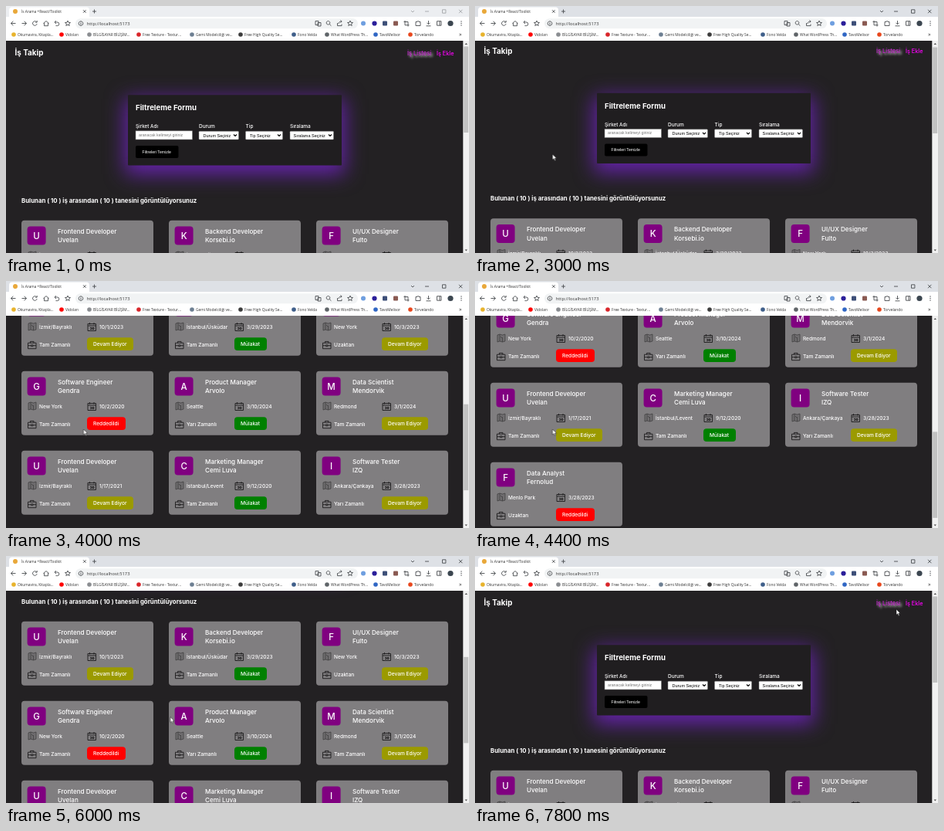
An HTML page for the animation above (8 s loop, 600x320 px).

```html
<!DOCTYPE html>
<html lang="tr">
<head>
<meta charset="utf-8">
<title>İş Takip</title>
<style>
@property --s { syntax: '<number>'; inherits: true; initial-value: 0; }
html, body { margin: 0; width: 100%; height: 100%; overflow: hidden; background: #232123; }
svg { display: block; width: 600px; height: 320px; animation: scroll 8s infinite; }
text { font-family: Inter, sans-serif; font-weight: 500; fill: #fff; white-space: pre; }
.bold { font-weight: 700; }
.ui { font-family: "Open Sans", "Noto Sans", sans-serif; font-weight: 400; fill: #333; }
.field { font-family: "Liberation Sans", Arial, sans-serif; font-weight: 400; }
.line { fill: none; stroke: #4a4d51; stroke-width: .9; }
.icon { fill: none; stroke: #1c1b1c; stroke-width: .9; }
.map { fill: #6f6d6f; stroke: #3c3a3c; stroke-width: .7; }
.glow { filter: blur(13px); }
.lit { text-shadow: 2px 2px 3px #ddd; }
#page { transform: translateY(calc(var(--s) * -1px)); }
#thumb { transform: translateY(calc(var(--s) * .406px)); }
#mouse { animation: mouse 8s infinite; }
#strip { animation: strip 8s step-end infinite; }
#controls { animation: controls 8s step-end infinite; }
/* the window gains focus after one second */
@keyframes strip { 0% { fill: #eceef1; } 12.5%, 100% { fill: #dee1e6; } }
@keyframes controls { 0% { opacity: .45; } 12.5%, 100% { opacity: 1; } }
@keyframes scroll {
  0% { --s: 0; animation-timing-function: step-end; }
  37.5% { --s: 2.5; animation-timing-function: steps(3); }
  45% { --s: 176; animation-timing-function: steps(4); }
  55% { --s: 352; animation-timing-function: steps(2); }
  60% { --s: 367; animation-timing-function: step-end; }
  67.5% { --s: 367; animation-timing-function: steps(3); }
  75% { --s: 193; animation-timing-function: steps(2); }
  80% { --s: 78; animation-timing-function: steps(2); }
  85% { --s: 10; animation-timing-function: step-end; }
  87.5%, 100% { --s: 0; }
}
@keyframes mouse {
  0% { transform: translate(225px, 330px); animation-timing-function: step-end; }
  12.5% { transform: translate(225px, 312px); animation-timing-function: steps(5); }
  25% { transform: translate(100.5px, 192px); animation-timing-function: step-end; }
  62.5% { transform: translate(100.5px, 192px); animation-timing-function: steps(2); }
  67.5% { transform: translate(213px, 208.5px); animation-timing-function: step-end; }
  92.5% { transform: translate(300px, 170px); animation-timing-function: step-end; }
  95% { transform: translate(440px, 106px); animation-timing-function: step-end; }
  97.5%, 100% { transform: translate(546px, 69px); }
}
</style>
</head>
<body>
<svg id="stage" viewBox="0 0 600 320"></svg>
<script>
const text = (x, y, size, str, attrs = '') =>
  `<text x="${x}" y="${y}" font-size="${size}" ${attrs}>${str}</text>`;
const rect = (x, y, w, h, fill, r = 0, attrs = '') =>
  `<rect x="${x}" y="${y}" width="${w}" height="${h}" rx="${r}" fill="${fill}" ${attrs}/>`;
const dot = (x, y, r, fill) => `<circle cx="${x}" cy="${y}" r="${r}" fill="${fill}"/>`;
const path = (d, cls = 'line', attrs = '') => `<path d="${d}" class="${cls}" ${attrs}/>`;

const badges = {
  'Devam Ediyor': [60, '#9b9a00'],
  'Mülakat': [42, '#008000'],
  'Reddedildi': [50, '#ff0000']
};
const [ongoing, interview, rejected] = Object.keys(badges);
const full = 'Tam Zamanlı', part = 'Yarı Zamanlı', remote = 'Uzaktan';
const jobs = [
  ['Frontend Developer', 'Uvelan', 'İzmir/Bayraklı', '10/1/2023', full, ongoing],
  ['Backend Developer', 'Korsebi.io', 'İstanbul/Üsküdar', '3/29/2023', full, interview],
  ['UI/UX Designer', 'Fulto', 'New York', '10/3/2023', remote, ongoing],
  ['Software Engineer', 'Gendra', 'New York', '10/2/2020', full, rejected],
  ['Product Manager', 'Arvolo', 'Seattle', '3/10/2024', part, interview],
  ['Data Scientist', 'Mendorvik', 'Redmond', '3/1/2024', full, ongoing],
  ['Frontend Developer', 'Uvelan', 'İzmir/Bayraklı', '1/17/2021', full, ongoing],
  ['Marketing Manager', 'Cemi Luva', 'İstanbul/Levent', '9/12/2020', full, interview],
  ['Software Tester', 'IZQ', 'Ankara/Çankaya', '3/28/2023', part, ongoing],
  ['Data Analyst', 'Fernolud', 'Menlo Park', '3/28/2023', remote, rejected]
];

function card([title, firm, place, date, kind, status], i) {
  const x = 20 + i % 3 * 191, y = 278 + Math.floor(i / 3) * 103;
  const [w, color] = badges[status];
  return `<g transform="translate(${x} ${y})">` +
    rect(0, -.3, 171, 83, '#807e80', 4) +
    rect(7.6, 7.4, 24, 24.2, '#800080', 4) +
    text(19.6, 23.6, 11.5, firm[0], 'text-anchor="middle"') +
    text(47, 16.5, 8.1, title) + text(47, 28.4, 8.1, firm) +
    path('M9 41l3 -1l3.5 1l3.5 -1v9l-3.5 1l-3.5 -1l-3 1zM12 40v9M15.5 44v6M13 43l2 2', 'map') +
    text(23, 47.5, 6.5, place) +
    path('M86 41.5h10.5v9h-10.5zM86 44h10.5M88.5 40v2.5M94 40v2.5M89 46.5h2v2h-2M92 46.5h2v2h-2z', 'icon') +
    text(101, 47.5, 6.6, date) +
    path('M8.5 66.2h10.5v7.5h-10.5zM11.5 66.2v-1.8h4.5v1.8M8.5 69.7h4M15 69.7h4M12.7 68.9h2.2v1.8h-2.2z', 'icon') +
    text(23, 71.3, 6.65, kind) +
    rect(85, 59.3, w, 16.7, color, 4) + text(93, 69.5, 6.6, status) + '</g>';
}

function select(x, w, label, hint, tx) {
  return text(x, 158, 6.5, label) +
    rect(x, 162.3, w, 10.7, '#fff', 1, 'stroke="#767676" stroke-width=".5"') +
    text(tx, 169.5, 5.5, hint, 'class="field" style="fill:#000"') +
    path(`M${x + w - 6.5} 166.5l2 2l2 -2`, 'line', 'style="stroke:#000;stroke-width:1.1"');
}

const form =
  rect(154, 120, 285, 98, '#6422a8', 0, 'class="glow"') +
  rect(158, 115.3, 277, 91.2, '#201e20', 1) +
  text(168, 135.4, 9.6, 'Filtreleme Formu', 'class="bold"') +
  text(168, 158, 6.3, 'Şirket Adı') +
  rect(168, 161.8, 73.5, 11.2, '#fff', 0, 'stroke="#767676" stroke-width=".6"') +
  text(172, 168.8, 5.25, 'aranacak kelimeyi giriniz', 'class="field" style="fill:#757575"') +
  select(250, 51.5, 'Durum', 'Durum Seçiniz', 255.5) +
  select(310.5, 48, 'Tip', 'Tip Seçiniz', 316) +
  select(368, 56.5, 'Sıralama', 'Sıralama Seçiniz', 372.5) +
  rect(168, 181, 55.5, 16, '#000', 2) +
  text(176.5, 190.8, 5.2, 'Filtreleri Temizle', 'class="field"');

const page = '<g id="page">' +
  text(11.6, 64, 9.9, 'İş Takip', 'class="bold"') +
  text(520, 63.5, 7.5, 'İş Listesi', 'class="lit" style="fill:#d222dc"') +
  text(558, 63.5, 7.3, 'İş Ekle', 'style="fill:#f0f"') +
  form +
  text(20, 254.6, 7.83, 'Bulunan ( 10 ) iş arasından ( 10 ) tanesini görüntülüyorsunuz', 'class="bold"') +
  jobs.map(card).join('') + '</g>';

const bookmarks = [
  [15, 'Okumavira, Kitapla...', '#e8b32c'],
  [77, 'Vidolan', '#f00'],
  [113, 'BİLGİSAYAR BİLİŞİM...', '#8a8d91'],
  [177, 'Free Texture - Textur...', '#d9252a'],
  [246, 'Gemi Modelciliği ve...', '#6d7f92'],
  [309, 'Free High Quality Se...', '#3b3b3b'],
  [378, 'Fono Velda', '#3f5f8a'],
  [421, 'What WordPress Th...', '#5f6468'],
  [484, 'TavoMelisor', '#2f66c4'],
  [529, 'Torvelando', '#e8471c']
];
const ui = (x, y, size, str) => text(x, y, size, str, 'class="ui"');

const chrome =
  rect(0, 0, 600, 45, '#fff') + rect(0, 0, 600, 14, '#dee1e6', 0, 'id="strip"') +
  rect(4, 1.5, 104, 16, '#fff', 4) +
  dot(12, 7, 3, '#e9a83a') + ui(20, 9, 4.75, 'İs Arama +React/Toolkit') +
  path('M100 5.2l3.6 3.6M103.6 5.2l-3.6 3.6M112 7h5M114.5 4.5v5') +
  path('M525 6l2 2l2 -2M543 7h5M565.5 4.8h4.4v4.4h-4.4zM587 4.8l4.4 4.4M591.4 4.8l-4.4 4.4', 'line', 'id="controls"') +
  path('M12.5 22.5h-6M9.3 19.7l-2.8 2.8l2.8 2.8M20.5 22.5h6M23.7 19.7l2.8 2.8l-2.8 2.8') +
  path('M39.6 20.8a2.8 2.8 0 1 0 .5 2.3M40.2 18.9v2.2h-2.2M48.5 22.5l3.5 -3l3.5 3M49.5 22v3.7h5v-3.7') +
  path('M65 19l-2 2l2 2M63 21h3.5a2.3 2.3 0 0 1 0 4.6h-2') +
  path('M80 19l1 2.3l2.5 .2l-1.9 1.6l.6 2.4l-2.2 -1.3l-2.2 1.3l.6 -2.4l-1.9 -1.6l2.5 -.2z') +
  rect(90, 16.2, 366, 13, '#f1f3f4', 6.5) +
  path('M97 19.8a2.8 2.8 0 1 0 .01 0M97 22v2.2M97 20.9v.6') +
  ui(104.8, 24.7, 5.75, 'http://localhost:5173') +
  path('M401 19.5h4v5h-4zM404 21.5h4v4.5h-4zM417.5 19.5a2.3 2.3 0 1 0 .01 0M419.2 23.5l2.2 2.2') +
  path('M429.5 22v3.6h5.5v-2M431 23c0 -2 1.5 -3 4 -3M433.5 18.5l1.7 1.5l-1.7 1.5') +
  path('M446 19l1 2.3l2.5 .2l-1.9 1.6l.6 2.4l-2.2 -1.3l-2.2 1.3l.6 -2.4l-1.9 -1.6l2.5 -.2z') +
  dot(463, 22.5, 3, '#6f9fe0') + dot(477.5, 22.5, 3.1, '#2b1f9a') +
  rect(488, 19.5, 6, 6, '#3d4f78', 1) + rect(502, 19.5, 6, 6, '#8a5a52', 1) +
  path('M517 18.8v6h5.5M515.5 20.5h5.5v6') +
  path('M531 20.5h2a1 1 0 0 1 2 0h2v5h-6zM547.5 19v4.5M545.5 21.8l2 2l2 -2M544.5 25.8h6') +
  path('M558.5 19.7h5.5v5.5h-5.5zM562 19.7v5.5') +
  dot(576, 22.5, 3.6, '#3b4650') +
  [20, 22.5, 25].map(y => dot(590, y, .7, '#4a4d51')).join('') +
  bookmarks.map(([x, name, color]) => dot(x - 5, 37, 2.8, color) + ui(x, 39, 4.85, name)).join('') +
  ui(587, 39, 7, '»');

const bar = rect(592.3, 45, 7.7, 275, '#f1f1f1') +
  rect(593.2, 52.5, 6, 111.5, '#c1c1c1', 0, 'id="thumb"') +
  path('M594.6 50l1.7 -2l1.7 2zM594.6 315.5l1.7 2l1.7 -2z', '', 'fill="#505050"');

const mouse = path('M0 0v7.2l1.7 -1.5l1.2 2.7l1.2 -.5l-1.2 -2.7h2.2z', '',
  'id="mouse" fill="#fff" stroke="#111" stroke-width=".5"');

document.getElementById('stage').innerHTML = page + chrome + bar + mouse;
</script>
</body>
</html>
```
